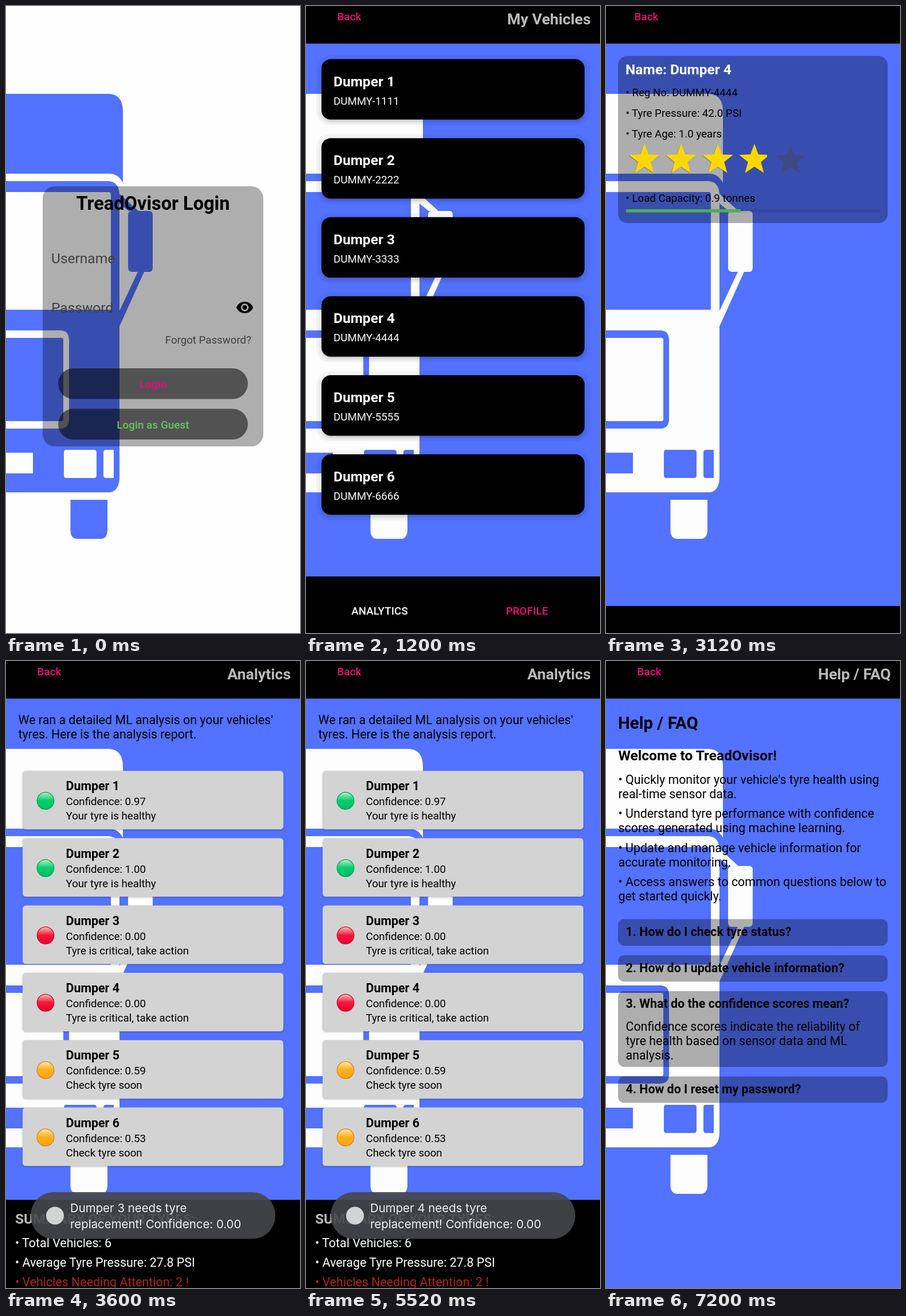
Write an HTML page that moves like this. It is 513 px wide and 1092 px high and loops after 8 s.

```html
<!DOCTYPE html>
<html lang="en">
<head>
<meta charset="utf-8">
<title>Vehicle app tour</title>
<style>
html, body { margin: 0; width: 100%; height: 100%; overflow: hidden; background: #fff; }
svg { display: block; width: 513px; height: 1092px; font-family: Roboto, sans-serif; }
.soft { filter: drop-shadow(0 3px 3px #0003); }
.thin { filter: drop-shadow(0 1px 1.5px #0004); }
</style>
</head>
<body>
<svg id="stage" viewBox="0 0 513 1092"></svg>
<script>
const BLUE = '#5272ff', PINK = '#ee0979', GREY = '#bababa', RED = '#b0231f';
const SHADE = 'rgba(0,0,0,.318)', DARK = 'rgba(0,0,0,.53)';
const SMALL = 18.7, BODY = 21.4, LARGE = 24.5, HEAD = 26.7;

const rect = (x, y, right, bottom, fill, r = 0, extra = '') =>
  `<rect x="${x}" y="${y}" width="${right - x}" height="${bottom - y}" rx="${r}" fill="${fill}" ${extra}/>`;
const text = (x, y, str, size, fill = '#000', weight = 400, anchor = 'start', extra = '') =>
  `<text x="${x}" y="${y}" font-size="${size}" fill="${fill}" font-weight="${weight}" text-anchor="${anchor}" ${extra}>${str}</text>`;
const bold = (x, y, str, size, fill) => text(x, y, str, size, fill, 700);
const label = (x, y, str, fill, anchor) =>
  text(x, y, str, SMALL, fill, 500, anchor, 'letter-spacing=".13"');
const lines = (x, ys, strs, size, fill) => strs.map((s, i) => text(x, ys[i], s, size, fill)).join('');
const each = (n, make) => Array.from({ length: n }, (_, i) => make(i)).join('');

const TRUCK = [
  'M0 153H179Q204 154 204 184V308Q196 292 180 292H0Z',
  'M0 305H179Q198 306 198 331V822Q197 846 180 847H0Z',
  'M0 324H179Q183 324 183 329V529H0Z',
  'M0 565H96Q110 566 110 582V719Q110 735 96 736H0Z',
  'M0 578H97Q100 578 100 582V719Q100 723 97 723H0Z',
  'M0 778H47V814H0Z',
  'M105 773H154Q158 773 158 778V817Q158 822 154 822H105Q101 822 101 817V778Q101 773 105 773Z',
  'M188 773H174Q170 773 170 778V817Q170 822 174 822H188Z',
  'M198 327L231 357H214L198 344Z',
  'M220 357H250Q256 357 256 364V455Q256 463 250 463H220Q213 463 213 455V364Q213 357 220 357Z',
  'M230 463H241L198 558V531Z',
  'M112.500 860H177V914Q176 927 167 928H123Q113 927 112.500 914Z'
].join('');
const truck = (fill, transform = '') =>
  `<path d="${TRUCK}" fill="${fill}" fill-rule="evenodd" transform="${transform}"/>`;
const page = (title, place) =>
  rect(0, 0, 513, 1092, BLUE) + truck('#fdfdfd', place) + rect(0, 0, 513, 65.5, '#000') +
  label(title ? 54.5 : 49.5, 25, 'Back', PINK) +
  text(497, 32, title, HEAD, GREY, 700, 'end');

function login() {
  const eye = 'M12 4.5C7 4.5 2.73 7.610 1 12c1.730 4.390 6 7.500 11 7.500s9.270-3.110 11-7.500c-1.730-4.390-6-7.500-11-7.500z' +
    'M7 12a5 5 0 0 1 10 0a5 5 0 0 1-10 0zM9 12a3 3 0 0 1 6 0a3 3 0 0 1-6 0z';
  return rect(0, 0, 513, 1092, '#fefefe') + truck(BLUE) +
    rect(64, 314, 449, 767, SHADE, 21) +
    text(256.5, 355, 'TreadOvisor Login', 32.5, '#000', 700, 'middle') +
    lines(79, [448, 534], ['Username', 'Password'], LARGE, '#404040') +
    `<path d="${eye}" fill-rule="evenodd" transform="translate(400.6 509) scale(1.336)"/>` +
    text(428, 588, 'Forgot Password?', SMALL, '#404040', 400, 'end') +
    rect(91, 631, 422, 684.5, DARK, 26.7) + label(256.5, 665, 'Login', PINK, 'middle') +
    rect(91, 701.5, 422, 755, DARK, 26.7) + label(256.5, 736, 'Login as Guest', '#69c36b', 'middle');
}

function vehicles() {
  const card = i => {
    const y = 92.5 + i * 137.65, n = i + 1;
    return rect(18, y - 7, 496, y + 115, 'rgba(0,0,0,.035)', 24) +
      rect(27, y, 486, y + 105.3, '#000', 16, 'class="soft"') +
      bold(48, y + 47, `Dumper ${n}`, LARGE, '#fff') +
      text(48, y + 79, `DUMMY-${String(n).repeat(4)}`, SMALL, '#fff');
  };
  return page('My Vehicles') + each(6, card) + rect(0, 993.5, 513, 1092, '#000') +
    label(128.5, 1060, 'ANALYTICS', '#fff', 'middle') + label(385.5, 1060, 'PROFILE', PINK, 'middle');
}

function details() {
  const star = (cx, cy, fill, extra = '') => {
    const pts = Array.from({ length: 10 }, (_, k) => {
      const r = k % 2 ? 11.8 : 28, a = k * Math.PI / 5;
      return [cx + r * Math.sin(a), cy - r * Math.cos(a)].map(v => v.toFixed(2));
    });
    return `<polygon points="${pts.join(' ')}" fill="${fill}" ${extra}/>`;
  };
  const base = each(5, i => star(66 + i * 64, 269, 'rgba(68,68,68,.38)'));
  const gold = each(4, i => star(67 + i * 64, 268, '#ffd700'));
  return page('') + rect(21, 87, 491.5, 378, SHADE, 16) +
    bold(34, 119, 'Name: Dumper 4', LARGE, '#fff') +
    lines(34.5, [157, 193, 229, 341], ['• Reg No: DUMMY-4444', '• Tyre Pressure: 42.0 PSI',
      '• Tyre Age: 1.0 years', '• Load Capacity: 0.9 tonnes'], SMALL) +
    `<clipPath id="rating">${rect(35, 235, 281, 300, '#000')}</clipPath>` +
    base + `<g clip-path="url(#rating)">${gold}</g>` +
    rect(35, 354, 478, 359.5, 'rgba(0,0,0,.07)') + rect(35, 354, 235, 359.5, '#4caf50') +
    rect(0, 1045, 513, 1092, '#000');
}

const LAMPS = {
  good: ['#a4edbf', '#00cf70', '#00bd64', '#0b9c5b'],
  bad: ['#ffb0a8', '#f5153d', '#e9002c', '#c01238'],
  warn: ['#ffe39a', '#fdb01c', '#f9a20f', '#d97c1c']
};
const NOTES = { good: 'Your tyre is healthy', bad: 'Tyre is critical, take action', warn: 'Check tyre soon' };
const REPORT = [['good', '0.97'], ['good', '1.00'], ['bad', '0.00'], ['bad', '0.00'], ['warn', '0.59'], ['warn', '0.53']];

function analytics(alertId) {
  const lamps = Object.entries(LAMPS).map(([id, c]) =>
    `<linearGradient id="${id}" x2="0" y2="1"><stop offset=".05" stop-color="${c[0]}"/>` +
    `<stop offset=".48" stop-color="${c[1]}"/><stop offset="1" stop-color="${c[2]}"/></linearGradient>`).join('');
  const card = i => {
    const y = 191.3 + i * 117.25, [state, score] = REPORT[i];
    return rect(29, y, 484, y + 102, '#d3d3d3', 5.5, 'class="thin"') +
      `<circle cx="69" cy="${y + 52.2}" r="14.8" fill="url(#${state})" stroke="${LAMPS[state][3]}" stroke-width="1.2"/>` +
      bold(104.5, y + 34, `Dumper ${i + 1}`, BODY) +
      lines(104.5, [y + 60, y + 85], [`Confidence: ${score}`, NOTES[state]], SMALL);
  };
  const toast = (y, str) => text(112, y, str, 20.4, '#f1f1f1', 400, 'start', 'font-family="Inter, sans-serif"');
  return page('Analytics') + lamps +
    lines(21.5, [110, 135], ["We ran a detailed ML analysis on your vehicles'",
      'tyres. Here is the analysis report.'], BODY) +
    each(6, card) + rect(0, 938.5, 513, 1092, '#000') +
    bold(16, 980, 'SUMMARY OF YOUR TYRES:', LARGE, GREY) +
    lines(16, [1021, 1055], ['• Total Vehicles: 6', '• Average Tyre Pressure: 27.8 PSI'], BODY, '#fff') +
    text(16, 1089, '• Vehicles Needing Attention: 2 !', BODY, RED) +
    rect(43, 925, 470, 1006.5, 'rgba(70,71,75,.91)', 40.5) +
    '<circle cx="85.500" cy="966" r="15.500" fill="#d3d3d3"/>' +
    toast(960, `Dumper ${alertId} needs tyre`) + toast(988, 'replacement! Confidence: 0.00');
}

function profile() {
  const rows = ['Name: User', 'Role: Supervisor', 'Contact:'];
  const links = ['Usage Policy', 'Help / FAQ', 'About App'];
  return page('Profile', 'translate(-11.6 47.5) scale(.69)') + rect(21, 87, 491.5, 381, SHADE, 16) +
    each(2, i => rect(21, 151 + i * 78, 491.5, 153.7 + i * 78, 'rgba(0,0,0,.3)')) +
    rows.map((s, i) => bold(34, 125.5 + i * 78, s, LARGE)).join('') +
    rect(302, 312, 478, 369, DARK, 28.5) + label(390, 348, 'Edit', '#fff', 'middle') +
    rect(0, 750.5, 513, 1092, '#000') +
    text(16, 790, 'Need help or more information? Check below:', BODY, '#b0b0b0') +
    links.map((s, i) => label(37, 840 + i * 75, `• ${s}`, '#fff')).join('') +
    label(47.5, 1065, 'LOGOUT', RED);
}

function help() {
  const faq = (y, bottom, str) => rect(21, y, 491.5, bottom, SHADE, 10.7) + bold(34.5, y + 29, str, BODY);
  return page('Help / FAQ') + bold(21, 118, 'Help / FAQ', 29.4) +
    bold(21.5, 173, 'Welcome to TreadOvisor!', LARGE) +
    lines(21.5, [214, 239, 273, 298, 333, 358, 392, 417], [
      "• Quickly monitor your vehicle's tyre health using", 'real-time sensor data.',
      '• Understand tyre performance with confidence', 'scores generated using machine learning.',
      '• Update and manage vehicle information for', 'accurate monitoring.',
      '• Access answers to common questions below to', 'get started quickly.'], BODY) +
    faq(449.5, 496, '1. How do I check tyre status?') +
    faq(512.5, 558.5, '2. How do I update vehicle information?') +
    faq(575, 707, '3. What do the confidence scores mean?') +
    lines(34.5, [644, 669, 694], ['Confidence scores indicate the reliability of',
      'tyre health based on sensor data and ML', 'analysis.'], BODY) +
    faq(723.5, 769.5, '4. How do I reset my password?');
}

const screens = [login, vehicles, details, () => analytics(3), () => analytics(4), profile, help];
const stage = document.getElementById('stage');
const start = performance.now();
let shown = -1;

function tick() {
  const now = Math.floor(((performance.now() - start) % 8000) / 1200);
  if (now !== shown) stage.innerHTML = screens[shown = now]();
  requestAnimationFrame(tick);
}
tick();
</script>
</body>
</html>
```
